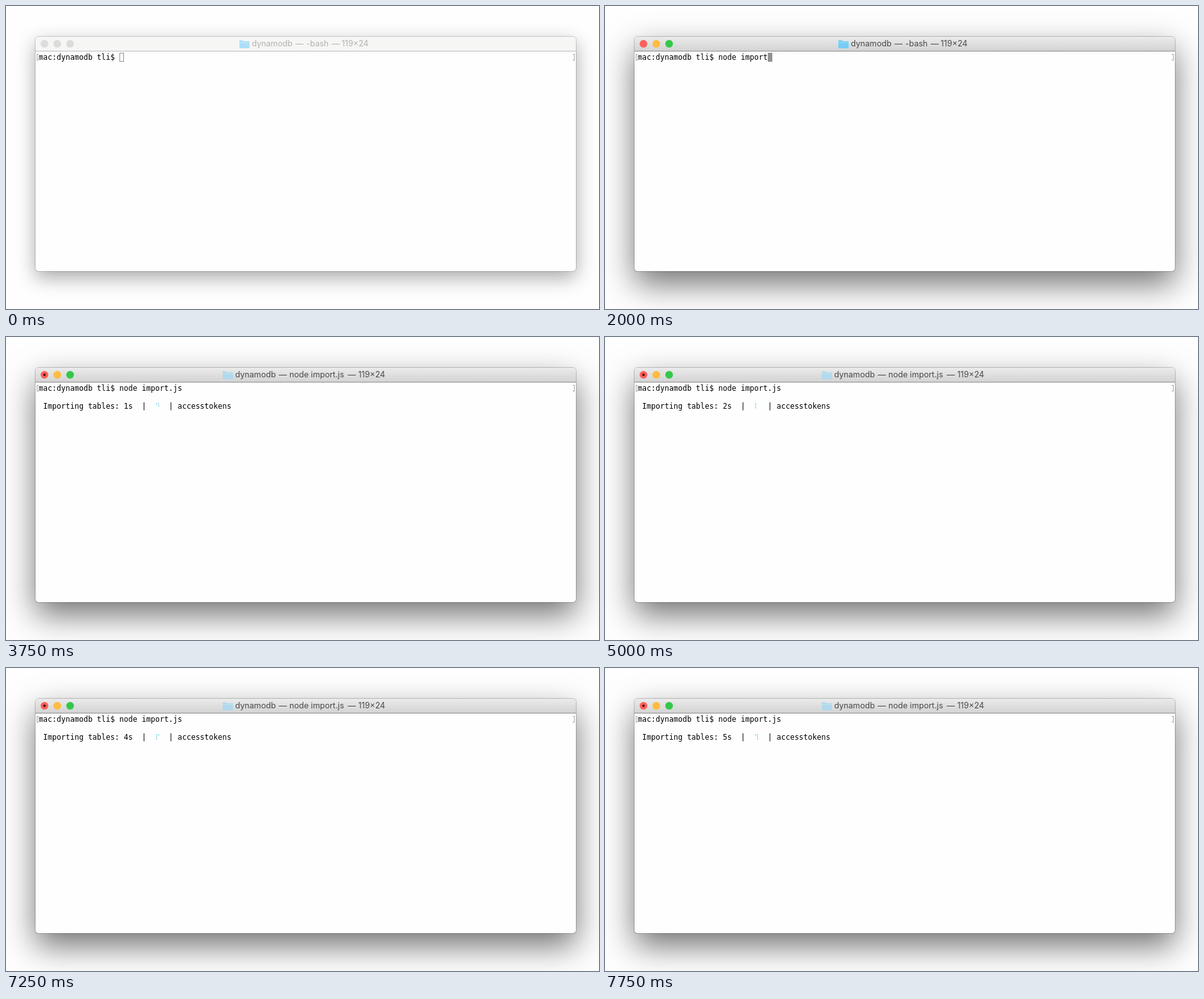
Animation of 925 by 473 pixels, one loop 8000 ms. Source, as an HTML page:

```html
<!DOCTYPE html>
<html lang="en">
<head>
<meta charset="utf-8">
<title>Terminal import</title>
<style>
html, body { margin: 0; width: 100%; height: 100%; overflow: hidden; background: #fefefe; }
#stage { position: relative; width: 925px; height: 473px; overflow: hidden; }
#stage * { position: absolute; box-sizing: border-box; }
#win {
  left: 46px; top: 48px; width: 843px; height: 366px; border-radius: 5px; background: #fefefe;
  box-shadow: 0 0 0 1px rgba(0,0,0,.2), 0 20px 50px rgba(0,0,0,.55);
}
#bar {
  left: 0; top: 0; width: 100%; height: 23px; border-radius: 5px 5px 0 0;
  background: linear-gradient(#ebebeb, #d3d3d3); border-bottom: 1px solid #8c8c8c;
}
.light { top: 5px; width: 12px; height: 12px; border-radius: 50%; }
.light:nth-child(1) { left: 8px; background: #fc605b; }
.light:nth-child(2) { left: 28px; background: #fdbc40; }
.light:nth-child(3) { left: 48px; background: #34c84a; }
#dirty { left: 4px; top: 4px; width: 4px; height: 4px; border-radius: 50%; background: #4d0a08; }
#icon { top: 5px; width: 16px; height: 13px; fill: #74cdf6; }
.title { top: 0; height: 22px; font: 12.6px/22px Inter, Roboto, sans-serif; color: #484848; white-space: pre; }
.line, #cursor { height: 14px; }
.line { left: 5px; font: 11.627px/14px "DejaVu Sans Mono", monospace; color: #000; white-space: pre; }
#cmd { top: 25px; }
#status { top: 53px; }
#cursor { width: 7px; background: #929292; }
.mark { top: 27px; width: 3px; height: 10px; border: 1px solid #a4a4a4; }
.mark.l { left: 2px; border-right: 0; }
.mark.r { left: 838px; border-left: 0; }
#spin { left: 188.3px; top: 55.7px; }
#spin i { width: 1.7px; height: 1.7px; border-radius: 50%; background: #2fb9c4; }

.idle#win { box-shadow: 0 0 0 1px rgba(0,0,0,.16), 0 10px 30px rgba(0,0,0,.34); }
.idle #bar { background: #f6f6f4; border-color: #bcbcbc; }
.idle .light { background: #dcdcdc; }
.idle .title { color: #b2b2b2; }
.idle #icon { fill: #addff9; }
.idle #cursor { background: none; border: 1px solid #929292; }
.busy #icon { fill: #b0d9ec; }
#win:not(.busy) :is(#dirty, #status, #spin, .node), .busy :is(#cursor, .bash) { display: none; }
</style>
</head>
<body>
<div id="stage">
  <div id="win" class="idle">
    <div id="bar">
      <b class="light"><b id="dirty"></b></b><b class="light"></b><b class="light"></b>
      <svg id="icon" viewBox="0 0 16 13"><path d="M0 1.5Q0 .5 1 .5H5.2L6.8 2H15Q16 2 16 3V12Q16 13 15 13H1Q0 13 0 12Z"/><path d="M0 4H16" stroke="#fff" stroke-opacity=".3"/></svg>
    </div>
    <div id="titles"></div>
    <b class="mark l"></b><b class="mark r"></b>
    <div id="cmd" class="line"></div>
    <div id="status" class="line"></div>
    <div id="spin"></div>
    <div id="cursor"></div>
  </div>
</div>
<script>
const $ = id => document.getElementById(id);
const LOOP = 8000, TICK = 250, CELL = 7, RUN = 3500;
const prompt = 'mac:dynamodb tli$ ', command = 'node import.js';
const spinner = '⠋⠙⠹⠸⠼⠴⠦⠧⠇⠏';

function addTitle(kind, parts) {
  for (const [x, text] of parts) {
    const span = document.createElement('span');
    span.className = 'title ' + kind;
    span.style.left = x - 46 + 'px';
    span.textContent = text;
    $('titles').append(span);
  }
}
addTitle('bash', [[383.5, 'dynamodb'], [451.5, '—'], [468.5, '-bash'], [508, '—'], [523.5, '119×24']]);
addTitle('node', [[357.5, 'dynamodb'], [425.5, '—'], [442, 'node import.js'], [533, '—'], [549.5, '119×24']]);

const dots = Array.from({ length: 6 }, (_, i) => {
  const dot = document.createElement('i');
  dot.style.left = (i > 2 ? 3 : 0) + 'px';
  dot.style.top = (i % 3) * 3 + 'px';
  $('spin').append(dot);
  return dot;
});

// Three letters per tick, a pause after "import", then the suffix
function typed(t) {
  if (t < 1250) return 0;
  if (t < 2750) return Math.min(11, 2 + 3 * Math.floor((t - 1250) / TICK));
  return t < 3000 ? 13 : 14;
}

function draw(t) {
  const busy = t >= RUN, count = typed(t), entered = t >= 3250;
  $('win').className = t < 750 ? 'idle' : busy ? 'busy' : '';
  $('icon').style.left = (busy ? 292 : 318) + 'px';
  $('cmd').textContent = prompt + command.slice(0, count);
  $('cursor').style.left = 5 + (entered ? 0 : prompt.length + count) * CELL + 'px';
  $('cursor').style.top = (entered ? 39 : 25) + 'px';
  if (!busy) return;
  const secs = Math.floor((t - 2750) / 1000);
  $('status').textContent = ` Importing tables: ${secs}s  |     | accesstokens`;
  const step = Math.floor(0.3 + 1.3 * (t - RUN) / TICK) % spinner.length;
  const bits = spinner.charCodeAt(step);
  dots.forEach((dot, i) => dot.style.opacity = bits >> i & 1);
}

const start = performance.now();
function frame() {
  const t = (performance.now() - start) % LOOP;
  draw(Math.floor(t / TICK) * TICK);
  requestAnimationFrame(frame);
}
draw(0);
requestAnimationFrame(frame);
</script>
</body>
</html>
```
